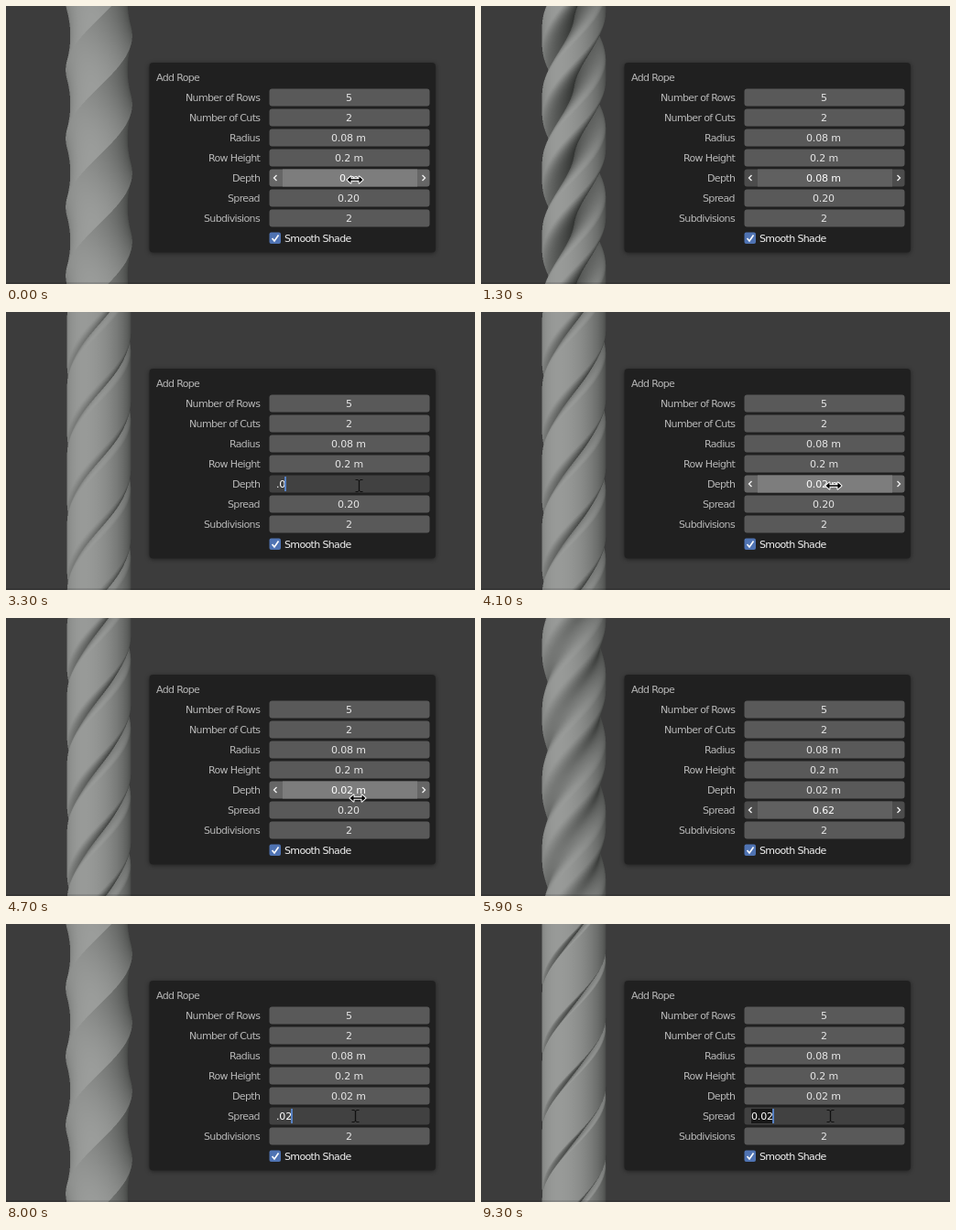
Recreate the animation shown at these times as an HTML page with a canvas. Size 512 by 304 pixels, loop 9400 ms.

```html
<!DOCTYPE html>
<html lang="en">
<head>
<meta charset="utf-8">
<title>Add Rope</title>
<style>
  html, body { margin: 0; width: 100%; height: 100%; overflow: hidden; background: #3c3c3c; }
  canvas { display: block; width: 512px; height: 304px; }
</style>
</head>
<body>
<canvas id="stage" width="512" height="304"></canvas>
<script>
const LOOP = 9400, STEP = 100;
const ctx = document.getElementById('stage').getContext('2d');
const clamp = (v, lo = 0, hi = 1) => Math.min(hi, Math.max(lo, v));
const FONT = '11px "DejaVu Sans", sans-serif';

// Eased interpolation through [time, value] keys.
function track(keys, t) {
  if (t <= keys[0][0]) return keys[0][1];
  for (let i = 1; i < keys.length; i++) {
    const [t0, a] = keys[i - 1], [t1, b] = keys[i];
    if (t < t1) {
      const u = (t - t0) / (t1 - t0);
      return a + (b - a) * u * u * (3 - 2 * u);
    }
  }
  return keys[keys.length - 1][1];
}

// Last entry whose start time has passed.
const latest = (list, t) => list.reduce((found, item) => item[0] <= t ? item : found);

const DEPTH = [[100, 0], [1000, 0.08], [1400, 0.08], [2200, 0.01]];
const SPREAD = [[5000, 0.2], [5800, 0.62], [6000, 0.62], [6600, 0]];

// [start, active row, mode, edited text, whole text selected]
const MODES = [
  [0, 'Depth', 'hover'], [200, 'Depth', 'drag'], [2300, 'Depth', 'hover'],
  [2500, 'Depth', 'edit', '0.01', true], [3100, 'Depth', 'edit', '.'],
  [3300, 'Depth', 'edit', '.0'], [3500, 'Depth', 'edit', '.02'],
  [3700, 'Depth', 'hover'], [4800, 'Spread', 'hover'], [5100, 'Spread', 'drag'],
  [6700, 'Spread', 'hover'], [7400, 'Spread', 'edit', '0.00', true],
  [7700, 'Spread', 'edit', '.'], [7800, 'Spread', 'edit', '.0'],
  [8000, 'Spread', 'edit', '.02'], [8200, 'Spread', 'hover'],
  [9200, 'Spread', 'edit', '0.02', true]
];
const POINTER_X = [[0, 381], [2300, 381], [2600, 385], [4000, 385], [4700, 384],
  [5000, 376], [6700, 376], [6800, 378], [7400, 381]];
const POINTER_Y = [[0, 190], [4300, 190], [4700, 197], [5000, 209], [7000, 209], [7400, 210]];

/* ---- rope ---- */
const SS = 2, ROPE_X = 58, ROPE_W = 86, ROPE_CX = 101.5, RADIUS = 34.8;
const TWIST = 2 * Math.PI / 225, LOBE = 2 * Math.PI / 3, SEGMENTS = 360;
const ropeCanvas = document.createElement('canvas');
ropeCanvas.width = ROPE_W * SS;
ropeCanvas.height = 304 * SS;
const ropeCtx = ropeCanvas.getContext('2d');
let ropeKey = '';

// Cross-section radius; the angle is measured from a groove.
function makeProfile(depth, spread) {
  const plain = Math.max(clamp(1 - depth / 0.006), clamp(1 - spread / 0.012));
  const inset = 0.78 * RADIUS * depth / 0.08;
  const width = clamp(0.02 + 1.1 * spread + 6.5 * depth, 0.05, 1.04);
  const soft = clamp((spread - 0.2) / 0.4);
  return angle => {
    const a = Math.abs(angle - LOBE * Math.round(angle / LOBE));
    const v = Math.min(1, a / width);
    const sharp = (1 - v) ** 2, round = 0.5 + 0.5 * Math.cos(Math.PI * v);
    const grooved = RADIUS - inset * (sharp + (round - sharp) * soft);
    // Rounded triangle: each face is an arc about a point beyond the centre.
    const u = LOBE / 2 - a, offset = 13;
    const ridged = -offset * Math.cos(u) + Math.sqrt(44.3 ** 2 - (offset * Math.sin(u)) ** 2);
    return grooved + (ridged - grooved) * plain;
  };
}

function shade(theta, r, slope, inset) {
  const g = slope / r;
  const nx = Math.sin(theta) - g * Math.cos(theta);
  const ny = -TWIST * slope;
  const nz = Math.cos(theta) + g * Math.sin(theta);
  const lit = (-0.45 * nx - 0.35 * ny + 0.82 * nz) / Math.hypot(nx, ny, nz);
  const occlusion = 1 / (1 + 0.06 * inset);
  return 36 + (8 + 112 * clamp((lit + 0.8) / 1.8)) * occlusion;
}

function renderRope(depth, spread) {
  const key = depth.toFixed(4) + '/' + spread.toFixed(4);
  if (key === ropeKey) return;
  ropeKey = key;
  const profile = makeProfile(depth, spread);
  const grooved = depth > 0.004 && spread > 0.01;
  const step = 2 * Math.PI / SEGMENTS;
  const ring = Array.from({ length: SEGMENTS }, (_, i) => {
    const a = (i + 0.5) * step, r = profile(a);
    return {
      edge: profile(i * step), r,
      slope: (profile(a + 0.008) - profile(a - 0.008)) / 0.016,
      inset: grooved ? Math.max(0, RADIUS - r) : 0
    };
  });
  const w = ropeCanvas.width, h = ropeCanvas.height;
  const image = ropeCtx.createImageData(w, h), px = image.data;
  const near = new Float32Array(w);
  const centre = (ROPE_CX - ROPE_X) * SS;
  for (let row = 0; row < h; row++) {
    near.fill(-1e3);
    const turn = -Math.PI / 2 + TWIST * (145 - (row + 0.5) / SS);
    for (let i = 0; i < SEGMENTS; i++) {
      const a = turn + i * step, b = a + step;
      const s = ring[i], end = ring[(i + 1) % SEGMENTS].edge;
      const x0 = centre + SS * s.edge * Math.sin(a);
      const x1 = centre + SS * end * Math.sin(b);
      if (x1 <= x0) continue;
      const z0 = s.edge * Math.cos(a), z1 = end * Math.cos(b);
      let tone = -1;
      for (let x = Math.ceil(x0 - 0.5); x < x1 - 0.5; x++) {
        const z = z0 + (z1 - z0) * (x + 0.5 - x0) / (x1 - x0);
        if (z <= near[x]) continue;
        near[x] = z;
        if (tone < 0) tone = shade(a + step / 2, s.r, s.slope, s.inset);
        const p = (row * w + x) * 4;
        px[p] = tone;
        px[p + 1] = tone + 2;
        px[p + 2] = tone;
        px[p + 3] = 255;
      }
    }
  }
  ropeCtx.putImageData(image, 0, 0);
}

/* ---- panel ---- */
function box(x, y, w, h, r, fill) {
  ctx.fillStyle = fill;
  ctx.beginPath();
  ctx.roundRect(x, y, w, h, r);
  ctx.fill();
}

// Text starts on a whole pixel; anchor is the part of its width left of x.
function text(str, x, y, color, anchor = 0, spacing = -0.15) {
  ctx.font = FONT;
  ctx.letterSpacing = spacing + 'px';
  ctx.fillStyle = color;
  ctx.fillText(str, Math.floor(x - anchor * ctx.measureText(str).width), y);
}
const label = (str, x, y, color, anchor) => text(str, x, y, color, anchor, -0.65);

function polyline(points, color, width) {
  ctx.strokeStyle = color;
  ctx.lineWidth = width;
  ctx.beginPath();
  points.forEach(([x, y]) => ctx.lineTo(x, y));
  ctx.stroke();
}

const fieldBox = (y, fill) => box(287.5, y - 9.5, 175, 19, 3, fill);

function editField(y, str, selected) {
  fieldBox(y, '#414141');
  ctx.font = FONT;
  ctx.letterSpacing = '-0.15px';
  const end = 295 + ctx.measureText(str).width;
  if (selected) box(295, y - 8, end - 295, 16, 0, '#181818');
  text(str, 295, y + 4, '#ffffff');
  box(Math.round(end) - 1, y - 8, 2, 16, 0, '#5680c2');
}

function valueField(y, str, mode) {
  fieldBox(y, mode === 'hover' ? '#666666' : mode ? '#4c4c4c' : '#595959');
  if (mode) {
    box(302, y - 9.5, 147, 19, 0, mode === 'hover' ? '#7d7d7d' : '#606060');
    for (const [x, dir] of [[294, -1], [456, 1]])
      polyline([[x - dir * 1.5, y - 3], [x + dir * 1.5, y], [x - dir * 1.5, y + 3]], '#eeeeee', 1.4);
  }
  text(str, 374.5, y + 4, mode ? '#ffffff' : '#e6e6e6', 0.5);
}

function drawPanel(depth, spread, row, mode, typed, selected) {
  ctx.save();
  ctx.shadowColor = 'rgba(0,0,0,.45)';
  ctx.shadowBlur = 5;
  ctx.shadowOffsetY = 1;
  box(156.5, 62, 312.5, 207.5, 4, '#202020');
  ctx.restore();
  label('Add Rope', 164, 82, '#b8b8b8');
  const rows = [
    ['Number of Rows', '5'], ['Number of Cuts', '2'], ['Radius', '0.08 m'],
    ['Row Height', '0.2 m'], ['Depth', +depth.toFixed(2) + ' m'],
    ['Spread', spread.toFixed(2)], ['Subdivisions', '2']
  ];
  rows.forEach(([name, value], i) => {
    const y = 100 + i * 22, active = name === row;
    label(name, 277.5, y + 4, '#b8b8b8', 1);
    if (active && mode === 'edit') editField(y, typed, selected);
    else valueField(y, value, active ? mode : '');
  });
  box(287.5, 247.5, 12.5, 12.5, 2, '#4f73b3');
  polyline([[290.5, 254], [293, 257], [297.5, 250.5]], '#ffffff', 1.6);
  label('Smooth Shade', 304, 258, '#f2f2f2');
}

function drawPointer(x, y, mode) {
  ctx.save();
  ctx.translate(x, y);
  if (mode === 'edit') {
    for (const side of [-1, 1])
      polyline([[-3.5, 6.5], [-1, 6.5], [0.5, 5.5], [2, 6.5], [4.5, 6.5]]
        .map(([px, py]) => [px, py * side]), '#101010', 1);
    polyline([[0.5, -6], [0.5, 6]], '#101010', 1.3);
  } else {
    ctx.beginPath();
    [[-8.5, 0], [-4.5, -3.6], [-4.5, -0.7], [4.5, -0.7], [4.5, -3.6], [8.5, 0],
      [4.5, 3.6], [4.5, 0.7], [-4.5, 0.7], [-4.5, 3.6]].forEach(p => ctx.lineTo(...p));
    ctx.closePath();
    ctx.lineJoin = 'round';
    ctx.strokeStyle = '#ffffff';
    ctx.lineWidth = 2;
    ctx.stroke();
    ctx.fillStyle = '#000000';
    ctx.fill();
  }
  ctx.restore();
}

function draw(t) {
  const depth = t >= 3700 ? 0.02 : track(DEPTH, t);
  const spread = t >= 8200 ? 0.02 : track(SPREAD, t);
  const [, row, mode, typed, selected] = latest(MODES, t);
  ctx.fillStyle = '#3c3c3c';
  ctx.fillRect(0, 0, 512, 304);
  renderRope(depth, spread);
  ctx.imageSmoothingQuality = 'high';
  ctx.drawImage(ropeCanvas, ROPE_X, 0, ROPE_W, 304);
  ctx.fillStyle = 'rgba(0,0,0,.12)';
  ctx.fillRect(0, 302, 512, 2);
  drawPanel(depth, spread, row, mode, typed, selected);
  if (mode !== 'drag') drawPointer(track(POINTER_X, t), track(POINTER_Y, t), mode);
}

const start = performance.now();
function frame() {
  const t = (performance.now() - start) % LOOP;
  draw(Math.floor(t / STEP) * STEP);
  requestAnimationFrame(frame);
}
frame();
</script>
</body>
</html>
```
